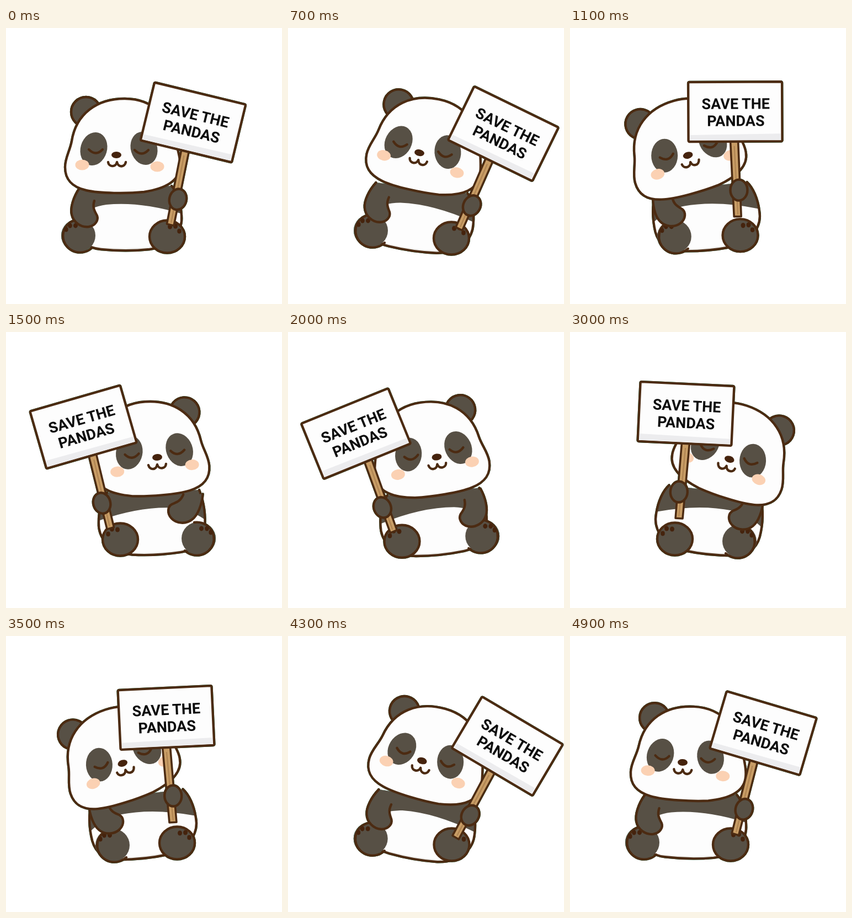
Recreate the animation shown at these times as an HTML page. Size 500x500 px, loop 5 s.

```html
<!DOCTYPE html>
<html lang="en">
<head>
<meta charset="utf-8">
<title>Save the pandas</title>
<style>
  html, body { margin: 0; height: 100%; overflow: hidden; background: #fff; }
  svg { display: block; width: 100vw; height: 100vh; }
  #panda { filter: drop-shadow(0 0 .7px #0a8a60); }
  .fur { fill: #575045; }
  .skin { fill: #fdfdfd; }
  .line { stroke: #4c2b12; stroke-width: 4.4; stroke-linecap: round; stroke-linejoin: round; }
  .open { fill: none; }
  .dark { fill: #45230d; }
  .blush { fill: #fbd1b3; }
  text { font: 700 27px Roboto, Arial, sans-serif; text-anchor: middle; fill: #0c0c0c; }
</style>
</head>
<body>
<svg viewBox="0 0 500 500">
  <g id="panda">
    <g id="torso">
      <path class="skin" d="M-79-112C-88-85-88-60-85-40C-80-12-60-3-40-1C-10 2 20 2 48-1C95-8 108-40 106-62C105-85 98-105 88-116Z"/>
      <path d="M-52-6Q0 0 56-6L48-1Q0 3-45-2Z" fill="#eeeeec"/>
      <path class="fur" d="M-79-112C-88-95-88-75-86-58Q-60-78-30-82Q30-88 105-66C105-85 98-105 88-116Z"/>
      <path class="line open" d="M-79-112C-88-85-88-60-85-40C-80-12-60-3-40-1C-10 2 20 2 48-1C95-8 108-40 106-62C105-85 98-105 88-116"/>
    </g>
    <g id="footL">
      <ellipse class="fur" rx="31" ry="30"/>
      <path class="line open" d="M8-29A31 30 0 1 0 25 22"/>
      <g class="dark">
        <ellipse cx="-22" cy="-11" rx="3.6" ry="4.4"/>
        <ellipse cx="-15" cy="-18" rx="3.8" ry="4.6"/>
        <ellipse cx="-5" cy="-18" rx="4" ry="4.4"/>
      </g>
    </g>
    <g id="arm">
      <path class="fur line" d="M-7-12C-18 4-24 24-21 36C-18 50-4 60 10 58C22 56 28 46 25 38C21 30 16 24 20 11" style="stroke:none"/>
      <path class="line open" d="M-7-12C-18 4-24 24-21 36C-18 50-4 60 10 58C22 56 28 46 25 38C21 30 16 24 20 11"/>
    </g>
    <g id="skull">
      <circle class="fur line" cx="-55" cy="-78" r="27"/>
      <circle class="fur line" cx="88" cy="-78" r="27"/>
      <path class="skin line" d="M15-102C72-102 98-62 108-22C112-6 117 10 115 24C112 50 82 62 50 67C20 70-30 70-55 64C-80 58-93 45-93 22C-93 5-84-8-81-25C-73-75-35-102 15-102Z"/>
      <g id="face">
        <ellipse class="fur" rx="24" ry="30.5" transform="translate(-41 -11) rotate(16)"/>
        <ellipse class="fur" rx="24" ry="30.5" transform="translate(50 -12) rotate(-16)"/>
        <ellipse class="blush" cx="-62" cy="18" rx="12.5" ry="9.5"/>
        <ellipse class="blush" cx="74" cy="21" rx="12.5" ry="9.5"/>
        <path class="line open" d="M-50-10Q-37 3-25-10M33-9Q46 4 58-9M-15 13C-14 22-1 23 1 13C3 23 15 23 17 13"/>
        <ellipse class="dark" rx="9" ry="6"/>
      </g>
    </g>
    <g id="footR">
      <ellipse class="fur line" rx="32" ry="29.5"/>
      <g class="dark">
        <ellipse cx="5" cy="-18" rx="4" ry="4.6"/>
        <ellipse cx="15" cy="-19" rx="4" ry="4.6"/>
        <ellipse cx="22" cy="-10" rx="3.8" ry="4.4"/>
      </g>
    </g>
    <g id="sign">
      <path class="line" d="M-9 53L-3 190L10 190L5 53Z" fill="#c89d66" style="stroke-width:3.6"/>
      <path d="M-2 62L4 186" stroke="#ae8250" stroke-width="2"/>
      <rect class="skin line" x="-85" y="-54" width="170" height="108" rx="2"/>
      <path d="M-82 42L82 40V51.500H-82Z" fill="#ececee"/>
      <g id="words"><text x="1" y="-5">SAVE THE</text><text x="1" y="26">PANDAS</text></g>
      <ellipse class="fur line" cx="6" cy="142" rx="15.500" ry="19"/>
    </g>
  </g>
</svg>
<script>
// head x, y, turn, face shift | body x, turn, arm turn | left foot | right foot | sign x, y, turn
const calm    = [200, 230, 0, 0,     212, 0, 0,     131, 376, 292, 378, 339, 171, 13.6];
const lean    = [238, 226, 12, 0,    222, 8, 0,     150, 367, 296, 381, 390, 191.5, 26];
const rise    = [226, 227, 4, 0,     223, 3, -42,   151, 374, 293, 376, 360, 172, 16.1];
const settle  = [190, 230, -4, 0,    201, 0, 0,     118, 375, 276, 379, 330, 171, 13];
const back    = [198, 235, -18.5, 14, 245, -6, -32, 193, 379, 310, 375, 290, 148, -2.7];
const far     = [243, 226, 16, 0,    222, 10, 0,    148, 367, 296, 378, 398, 200, 30.8];
const ease    = [204, 229, 3, 0,     212, 1, 0,     131, 374, 291, 378, 350, 176, 16.5];
const leftFar = rise.map((v, i) => v + (lean[i] - v) * 0.65);

const LOOP = 5000, STEP = 100;
const keys = [[0, calm], [500, far], [700, lean], [1200, back], [1500, rise], [1900, leftFar],
              [2500, settle], [3000, back], [3500, back], [4340, far], [4900, ease]];

const key = i => {
  const n = keys.length, [t, p] = keys[(i + n) % n];
  return [t + LOOP * Math.floor(i / n), p];
};

// Smooth curve through the keys without overshoot
function poseAt(t) {
  let i = keys.length - 1;
  while (keys[i][0] > t) i--;
  const [a, b, c, d] = [-1, 0, 1, 2].map(k => key(i + k));
  const span = c[0] - b[0], u = (t - b[0]) / span;
  const slope = (p, q, k) => (q[1][k] - p[1][k]) / (q[0] - p[0]);
  const tangent = (s, r) => s * r > 0 ? 2 * s * r / (s + r) : 0;
  return b[1].map((v, k) => {
    const mid = slope(b, c, k);
    const m0 = tangent(slope(a, b, k), mid) * span;
    const m1 = tangent(mid, slope(c, d, k)) * span;
    const w = u * u * (3 - 2 * u);
    return v + (c[1][k] - v) * w + m0 * u * (1 - u) ** 2 - m1 * u * u * (1 - u);
  });
}

const set = (id, value) => document.getElementById(id).setAttribute('transform', value);
const place = (id, x, y, turn = 0) => set(id, `translate(${x} ${y}) rotate(${turn})`);

function draw(t) {
  const [hx, hy, ha, face, bx, ba, arm, lx, ly, rx, ry, sx, sy, sa] = poseAt(t);
  const flipped = t >= 1300 && t < 3100;
  place('torso', bx, 402, ba);
  set('arm', `translate(${bx} 402) rotate(${ba}) translate(-72 -100) rotate(${arm})`);
  place('footL', lx, ly);
  place('footR', rx, ry);
  place('skull', hx, hy, ha);
  place('face', face, 0);
  place('sign', sx, sy, sa);
  set('panda', flipped ? 'translate(500 0) scale(-1 1)' : '');
  set('words', flipped ? 'scale(-1 1)' : '');
}

const start = performance.now();
function tick() {
  const t = (performance.now() - start) % LOOP;
  draw(Math.floor(t / STEP) * STEP);
  requestAnimationFrame(tick);
}
tick();
</script>
</body>
</html>
```
